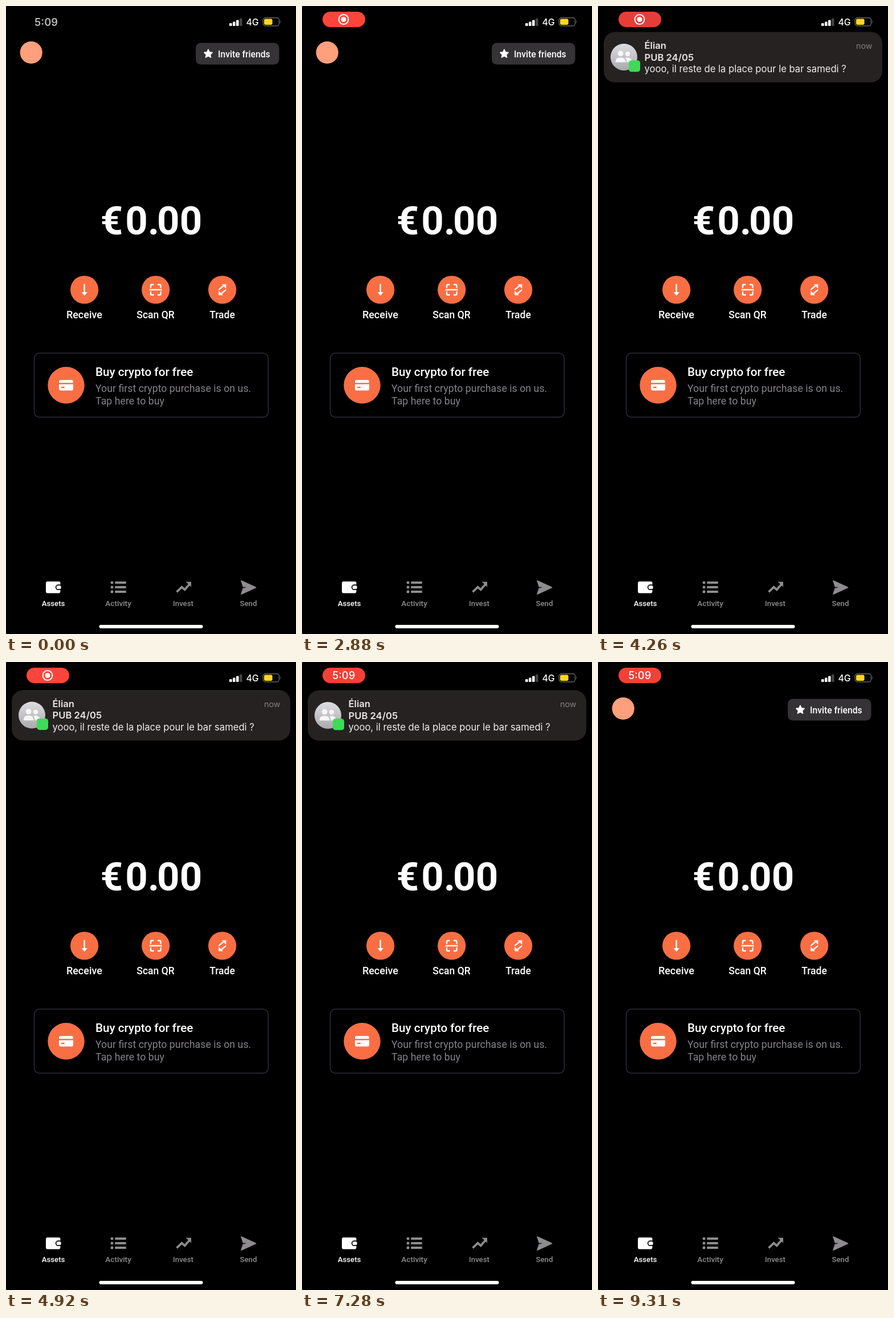
An HTML page that plays this animation: 509 px wide and 1100 px high, repeating every 9330 ms.

```html
<!DOCTYPE html>
<html lang="en">
<head>
<meta charset="utf-8">
<title>Wallet home</title>
<style>
html, body { margin: 0; width: 100%; height: 100%; overflow: hidden; background: #000; }
svg { display: block; width: 100%; height: 100%; }
text { font-family: Roboto, sans-serif; font-weight: 500; fill: #fff; }
.sys, .sys text { font-family: Inter, sans-serif; }
.mid { text-anchor: middle; }
.tab { font-size: 13.2px; text-anchor: middle; }
.off text { fill: #8e8c8e; }
.act { font-size: 17.5px; text-anchor: middle; }
.note { font-size: 17.8px; font-weight: 400; fill: #85828a; }
.line { fill: none; stroke: #fff; stroke-width: 2.4; stroke-linecap: round; stroke-linejoin: round; }
.grey { fill: #8e8c8e; }
</style>
</head>
<body>
<svg viewBox="0 0 509 1100" xmlns="http://www.w3.org/2000/svg">
  <defs>
    <linearGradient id="face" x1="0" y1="0" x2="0" y2="1">
      <stop offset="0" stop-color="#dddce0"/>
      <stop offset="1" stop-color="#aaa9ae"/>
    </linearGradient>
  </defs>
  <rect width="509" height="1100" fill="#000"/>

  <!-- status bar -->
  <text id="clock" class="sys mid" x="70.5" y="34.7" font-size="18.3" style="font-weight:600">5:09</text>
  <g id="pill">
    <rect id="pillBox" x="36" y="10" width="75" height="27" rx="13.5"/>
    <g id="rec">
      <circle cx="73" cy="23.5" r="8.4" fill="none" stroke="#fff" stroke-width="2"/>
      <circle cx="73" cy="23.5" r="4.5" fill="#fff"/>
    </g>
    <text id="pillClock" class="sys mid" x="73.2" y="30" font-size="18.4">5:09</text>
  </g>
  <g fill="#fff">
    <rect x="392" y="30" width="4.6" height="5" rx="1.2"/>
    <rect x="398" y="27.5" width="4.6" height="7.5" rx="1.2"/>
    <rect x="404" y="24.5" width="4.6" height="10.5" rx="1.2"/>
    <rect x="410" y="21.5" width="4.6" height="13.5" rx="1.2" fill="#434343"/>
  </g>
  <text class="sys" x="421.5" y="34.2" font-size="15.8">4G</text>
  <rect x="451.2" y="20.6" width="28.2" height="14.2" rx="4.2" fill="none" stroke="#77767a" stroke-width="1.2"/>
  <path d="M481 25.3q2 2.4 0 4.8z" fill="#77767a"/>
  <rect x="453" y="22.4" width="14.6" height="10.6" rx="2.4" fill="#fdd426"/>

  <!-- header -->
  <circle cx="44.2" cy="81.5" r="19.6" fill="#ff9f7c"/>
  <rect x="333" y="64.5" width="146.5" height="38" rx="9" fill="#353336"/>
  <path id="star" fill="#fff" stroke="#fff" stroke-width="1.6" stroke-linejoin="round"/>
  <text x="372" y="90" font-size="15.7">Invite friends</text>

  <text class="mid" x="255" y="400.3" dx="0 4 0 -4 0" font-size="69" style="font-weight:700">€0.00</text>

  <!-- actions -->
  <g fill="#fa6e44">
    <circle cx="137.6" cy="497" r="24.6"/>
    <circle cx="262.7" cy="497" r="24.6"/>
    <circle cx="379.6" cy="497" r="24.6"/>
    <circle cx="105.5" cy="664.3" r="32.2"/>
  </g>
  <path class="line" d="M137.6 488V503"/>
  <path fill="#fff" d="M132.4 501.2H142.8L137.6 507.6Z"/>
  <path class="line" d="M254 493V489.5Q254 488 255.5 488H258.5M267 488H270Q271.5 488 271.5 489.5V493M271.5 501V504.5Q271.5 506 270 506H267M258.5 506H255.5Q254 506 254 504.5V501M252.8 497H272.7"/>
  <path class="line" d="M374.2 496.4L382 489.8M385.4 497.6L377.6 504.2"/>
  <path fill="#fff" d="M378.6 487.4H386.4V495.2ZM381 506.6H373.2V498.8Z"/>
  <text class="act" x="137.5" y="547.3" style="font-size:18px">Receive</text>
  <text class="act" x="262.5" y="547.3">Scan QR</text>
  <text class="act" x="379.5" y="547.3">Trade</text>

  <!-- offer -->
  <rect x="49.5" y="608" width="410.8" height="112.3" rx="9" fill="none" stroke="#302d3a" stroke-width="1.4"/>
  <rect x="93" y="655" width="25" height="18.4" rx="3" fill="#fff"/>
  <path d="M93 661.2H118M97 668H102.5" stroke="#fa6e44" stroke-width="2.4"/>
  <text x="157" y="648" font-size="20.7">Buy crypto for free</text>
  <text class="note" x="157" y="676">Your first crypto purchase is on us.</text>
  <text class="note" x="157" y="698">Tap here to buy</text>

  <!-- tabs -->
  <rect x="70" y="1008" width="25.4" height="20.4" rx="2.8" fill="#fff"/>
  <rect x="87.6" y="1014.2" width="10" height="8" rx="4" fill="#fff" stroke="#000" stroke-width="1.7"/>
  <g id="list" class="grey"></g>
  <path d="M299.6 1026.4L308.6 1017.8L313.8 1022.4L322 1012.6" fill="none" stroke="#8e8c8e" stroke-width="3.8"/>
  <path class="grey" d="M315.8 1008.6H325V1017.8Z"/>
  <path class="grey" d="M413 1006.8L438.5 1018.5L413 1030.2L416.2 1020.2L427 1018.5L416.2 1016.8Z" stroke="#8e8c8e" stroke-width="1.6" stroke-linejoin="round"/>
  <text class="tab" x="83" y="1051.3">Assets</text>
  <g class="off">
    <text class="tab" x="197" y="1051.3" style="font-size:13.6px">Activity</text>
    <text class="tab" x="311" y="1051.3">Invest</text>
    <text class="tab" x="425.5" y="1051.3">Send</text>
  </g>
  <rect x="163.5" y="1084" width="182" height="6" rx="3" fill="#fff"/>

  <!-- banner, drawn at its resting place -->
  <g id="banner" class="sys">
    <rect x="10" y="49.5" width="489" height="88.3" rx="20" fill="#262222"/>
    <circle cx="45.5" cy="93.5" r="23.5" fill="url(#face)"/>
    <g fill="#f7f7f8">
      <circle cx="39.6" cy="87.2" r="4.9"/>
      <path d="M30.5 102.6Q30.5 94.2 39.6 94.2Q48.7 94.2 48.7 102.6Z"/>
      <circle cx="52" cy="88" r="4.2"/>
      <path d="M50.6 102.6Q50.4 97.6 47.8 95.2Q49.6 94.4 52 94.4Q59.8 94.4 59.8 102.6Z"/>
    </g>
    <rect x="54" y="99.3" width="20" height="20" rx="4.6" fill="#3ddb57"/>
    <text x="81.5" y="79" font-size="16.6" style="font-weight:600;fill:#e9e6e5">Élian</text>
    <text x="81.5" y="99.7" font-size="16.6" style="font-weight:600;fill:#e9e6e5">PUB 24/05</text>
    <text x="81.5" y="120.4" font-size="16.6" style="font-weight:400;fill:#f0eeed">yooo, il reste de la place pour le bar samedi ?</text>
    <text x="481.5" y="79" font-size="14.3" text-anchor="end" style="font-weight:400;fill:#858180">now</text>
  </g>
</svg>
<script>
const LOOP = 9330, HIDDEN = -140;
const el = id => document.getElementById(id);
const clamp = v => Math.min(1, Math.max(0, v));
const ease = v => (1 - Math.cos(Math.PI * clamp(v))) / 2;
const span = (t, from, to) => ease((t - from) / (to - from));
const mix = (a, b, k) => a + (b - a) * k;

function buildIcons() {
  const pts = [];
  for (let i = 0; i < 10; i++) {
    const a = Math.PI * (i / 5 - 0.5), r = i % 2 ? 3.7 : 7.6;
    pts.push((355 + r * Math.cos(a)).toFixed(2) + ' ' + (83.8 + r * Math.sin(a)).toFixed(2));
  }
  el('star').setAttribute('d', 'M' + pts.join('L') + 'Z');
  el('list').innerHTML = [1010, 1018, 1026].map(y =>
    `<circle cx="186" cy="${y}" r="2.5"/><rect x="191" y="${y - 2.1}" width="20" height="4.2" rx="1.6"/>`).join('');
}

// Critically damped slide in, smooth slide out.
function bannerShift(t) {
  if (t < 2944) return HIDDEN;
  if (t >= 7900) return HIDDEN * span(t, 7900, 8660);
  const x = 0.0041 * (t - 2944);
  return HIDDEN * (1 + x) * Math.exp(-x);
}

function draw(t) {
  el('clock').setAttribute('opacity', 0.73 * (1 - span(t, 10, 180)));

  const grow = span(t, 60, 420), size = mix(0.6, 1, grow);
  const pill = el('pill');
  pill.setAttribute('opacity', grow);
  pill.setAttribute('transform', `translate(73.5 23.5) scale(${size}) translate(-73.5 -23.5)`);

  const glow = (1 + Math.cos((t - 2880) / 2000 * 2 * Math.PI)) / 2;
  const rgb = [[220, 255], [58, 69], [54, 58]].map(([lo, hi]) => Math.round(mix(lo, hi, glow)));
  el('pillBox').setAttribute('fill', `rgb(${rgb})`);

  const swap = span(t, 5720, 6180);
  el('rec').setAttribute('opacity', 1 - swap);
  el('pillClock').setAttribute('opacity', swap);

  el('banner').setAttribute('transform', `translate(0 ${bannerShift(t).toFixed(2)})`);
}

function tick() {
  draw(performance.now() % LOOP);
  requestAnimationFrame(tick);
}

buildIcons();
tick();
</script>
</body>
</html>
```
